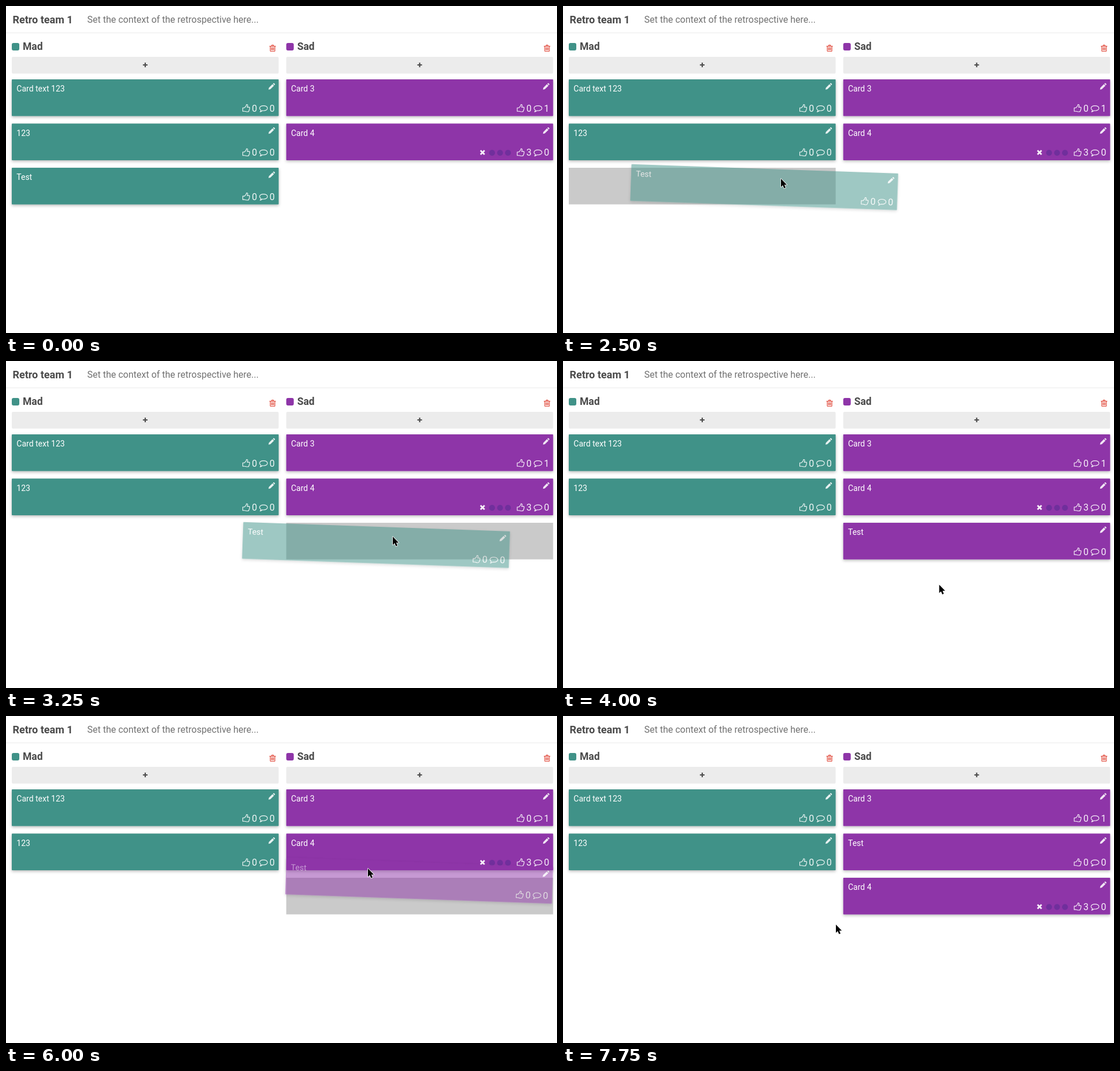
An HTML page that plays this animation: 953 by 566 pixels, repeating every 8000 ms.

```html
<!DOCTYPE html>
<html lang="en">
<head>
<meta charset="utf-8">
<title>Retro board</title>
<style>
  html, body { margin: 0; width: 100%; height: 100%; overflow: hidden; background: #fff; }
  svg { display: block; width: 953px; height: 566px; font-family: Roboto, sans-serif; }
  .title, .name { font-weight: 700; fill: #4a4a4a; }
  .title { font-size: 18px; }
  .name { font-size: 17.5px; }
  .context { font-size: 16px; fill: #717171; }
  .label { font-size: 14px; fill: #fff; }
  .count { font-size: 16px; fill: #fff; fill-opacity: .93; }
  .line { fill: none; stroke: #fff; stroke-opacity: .93; stroke-width: 1.15; stroke-linejoin: round; }
  .solid { fill: #fff; fill-opacity: .87; }
</style>
</head>
<body>
<svg id="stage" viewBox="0 0 953 566">
  <defs>
    <filter id="shadow" x="-5%" y="-25%" width="110%" height="160%">
      <feDropShadow dx="0" dy="2" stdDeviation="2.4" flood-color="#000" flood-opacity=".27"/>
    </filter>
    <path id="thumb" class="line" d="M.7 6.4H3.7L6.4 3.4 7.2.8Q9.4.5 9.2 2.8L8.4 5.3H11.6Q13.3 5.8 12.4 7.4 13 8.4 12 9.3 12.4 10.5 11.3 11.2 11.3 13.2 9.4 13.2H7.4L4 12.4H.7Z"/>
    <path id="bubble" class="line" d="M7.6 1C11.5 1 14.4 2.9 14.4 5.3S11.5 9.6 7.6 9.6Q6.6 9.6 5.7 9.4 4 11 1.7 11.5 3.1 10.2 3.2 8.6 .8 7.3.8 5.3C.8 2.9 3.7 1 7.6 1Z"/>
    <g id="pencil" class="solid">
      <path d="M0 11.4.7 8.1 6.9 2 9.5 4.6 3.3 10.8ZM7.6 1.3 8.6.3Q9.2-.1 9.8.4L11.1 1.7Q11.5 2.2 11.1 2.8L10.1 3.9Z"/>
    </g>
    <g id="trash" fill="none" stroke="#e25143" stroke-width="1.2">
      <path d="M0 2.6H11M3.6 2.4 4.2.7H6.8L7.4 2.4M1.5 2.8V10.4Q1.6 11.5 2.5 11.5H8.5Q9.4 11.5 9.5 10.4V2.8M3.6 4.6V9.7M5.5 4.6V9.7M7.4 4.6V9.7"/>
    </g>
  </defs>
  <rect width="953" height="566" fill="#fff"/>
  <text class="title" x="11.5" y="30">Retro team 1</text>
  <text class="context" x="140.5" y="29">Set the context of the retrospective here...</text>
  <rect y="46" width="953" height="1" fill="#ececec"/>
  <g id="board"></g>
  <path id="cursor" fill="#000" stroke="#fff" stroke-width="1.5" paint-order="stroke"
        stroke-linejoin="round" d="M0 0V14.2L3.2 11.3 5.4 16.6 8 15.5 5.8 10.4H10.2Z"/>
</svg>
<script>
const LOOP = 8000, STEP = 250;
const W = 461.6, H = 63.4, PITCH = 76.5, TOP = 127;
const COLS = [
  { x: 10, name: 'Mad', color: '#409288' },
  { x: 484.7, name: 'Sad', color: '#8e35a8' }
];
const board = document.getElementById('board');
const cursor = document.getElementById('cursor');

// Pointer path: time, x, y
const PATH = [
  [1000, 287, 258], [1500, 270, 294], [1750, 268, 297], [2000, 268, 297],
  [2250, 288, 298], [2500, 377, 299], [3000, 612, 303], [3250, 669, 304],
  [3500, 668, 308], [4250, 642, 427], [4500, 642, 427], [5250, 632, 318],
  [5500, 626.5, 292], [5750, 626, 284], [6000, 626, 264], [6500, 626, 221],
  [6750, 626, 217], [7000, 626, 217], [7250, 600, 262], [7500, 520, 379],
  [7750, 472, 361]
];
// Drags: start, end, card centre relative to the pointer
const DRAGS = [
  { from: 2250, to: 3500, dx: -29, dy: 14.5 },
  { from: 5750, to: 7000, dx: 88.6, dy: 21 }
];

function group(html) {
  const g = document.createElementNS('http://www.w3.org/2000/svg', 'g');
  g.innerHTML = html;
  board.appendChild(g);
  return g;
}

function column({ x, name, color }) {
  const mid = x + W / 2;
  group(`
    <rect x="${x}" y="64" width="13" height="13" rx="3" fill="${color}"/>
    <text class="name" x="${x + 19}" y="76">${name}</text>
    <use href="#trash" x="${x + 445.6}" y="67"/>
    <rect x="${x}" y="88" width="${W}" height="29" rx="2" fill="#ececec"/>
    <path d="M${mid - 4} 102H${mid + 4}M${mid} 98V106" stroke="#4a4a4a" stroke-width="2.1"/>`);
}

function card(label, col, likes, notes, voted) {
  const dots = [356, 369.8, 383.5].map(x => `<circle cx="${x}" cy="50.6" r="5.1" fill="#702f9c"/>`);
  const votes = `<path d="M336 46.6 343 53.6M343 46.6 336 53.6" stroke="#fff"
    stroke-opacity=".93" stroke-width="2.8"/>${dots.join('')}`;
  return group(`
    <rect class="face" width="${W}" height="${H}" rx="1" fill="${COLS[col].color}" filter="url(#shadow)"/>
    <text class="label" x="8.3" y="21">${label}</text>
    <use href="#pencil" x="444" y="6.3"/>
    ${voted ? votes : ''}
    <use href="#thumb" x="398.8" y="42.8"/>
    <text class="count" x="415.3" y="55.5">${likes}</text>
    <use href="#bubble" x="427.8" y="44.6"/>
    <text class="count" x="445.7" y="55.5">${notes}</text>`);
}

function place(el, col, row) {
  el.setAttribute('transform', `translate(${COLS[col].x} ${TOP + row * PITCH})`);
}

COLS.forEach(column);
place(card('Card text 123', 0, 0, 0), 0, 0);
place(card('123', 0, 0, 0), 0, 1);
place(card('Card 3', 1, 0, 1), 1, 0);
const four = card('Card 4', 1, 3, 0, true);
const gap = group(`<rect width="${W}" height="${H}" fill="#cacaca"/>`);
const test = card('Test', 0, 0, 0);
const face = test.querySelector('.face');

function pointer(t) {
  const i = PATH.findIndex(p => p[0] > t);
  if (i < 0) return PATH[PATH.length - 1].slice(1);
  const [t0, x0, y0] = PATH[i - 1], [t1, x1, y1] = PATH[i];
  const k = (t - t0) / (t1 - t0);
  return [x0 + (x1 - x0) * k, y0 + (y1 - y0) * k];
}

function draw(time) {
  const t = Math.floor(time / STEP) * STEP;
  const shown = t >= PATH[0][0];
  const [x, y] = shown ? pointer(t) : [0, 0];
  cursor.style.display = shown ? '' : 'none';
  cursor.setAttribute('transform', `translate(${x} ${y})`);

  const col = t >= 2750 ? 1 : 0;
  const row = t >= 6250 ? 1 : 2;
  place(four, 1, row === 1 ? 2 : 1);
  place(gap, col, row);

  const drag = DRAGS.find(d => t >= d.from && t < d.to);
  gap.style.display = drag ? '' : 'none';
  test.setAttribute('opacity', drag ? .5 : 1);
  face.setAttribute('fill', COLS[t >= DRAGS[0].to ? 1 : 0].color);
  if (drag) {
    test.setAttribute('transform',
      `translate(${x + drag.dx} ${y + drag.dy}) rotate(2) translate(${-W / 2} ${-H / 2})`);
  } else {
    place(test, col, row);
  }
}

const start = performance.now();
function tick() {
  draw((performance.now() - start) % LOOP);
  requestAnimationFrame(tick);
}
tick();
</script>
</body>
</html>
```
